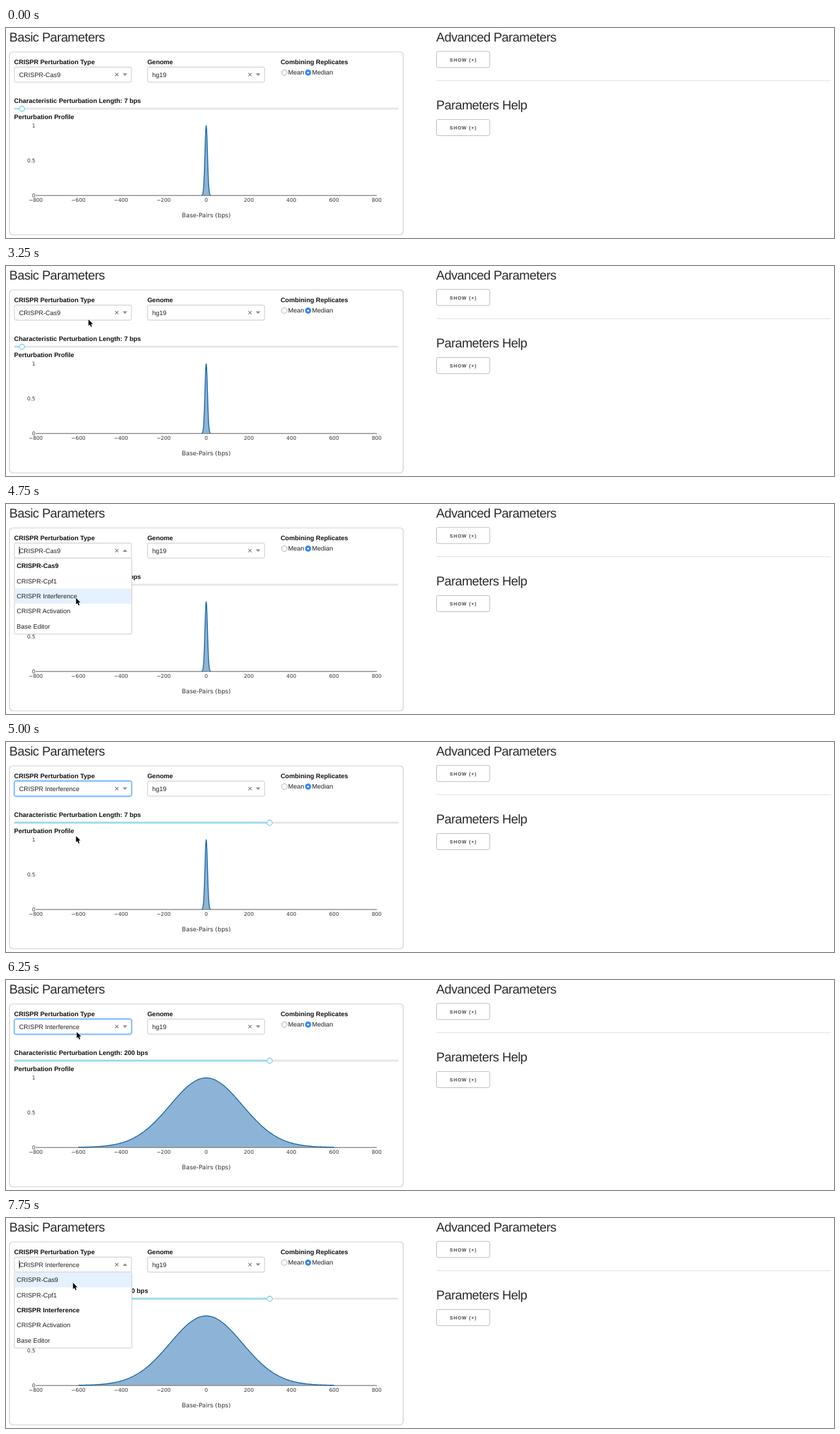
An HTML page that plays this animation: 1280 px wide and 325 px high, repeating every 8 s.

```html
<!DOCTYPE html>
<html lang="en">
<head>
<meta charset="utf-8">
<title>Parameters</title>
<style>
  html, body { margin: 0; width: 100%; height: 100%; overflow: hidden; background: #fff; }
  svg { display: block; width: 1280px; height: 325px; }
  text { font: 9.95px "Liberation Sans", Arial, sans-serif; fill: #222; text-rendering: geometricPrecision; white-space: pre; }
  .heading { font-size: 19.8px; letter-spacing: -.53px; fill: #2a2a2a; }
  .bold { font-weight: 700; fill: #111; }
  .button { font-size: 7.3px; font-weight: 700; letter-spacing: 1px; fill: #444; }
  .tick { font: 8px "DejaVu Sans", Verdana, sans-serif; fill: #333; }
  .title { font: 9.4px "DejaVu Sans", Verdana, sans-serif; fill: #333; }
</style>
</head>
<body>
<svg id="stage" viewBox="0 0 1280 325" xmlns="http://www.w3.org/2000/svg"></svg>
<script>
const LOOP = 8000;
const OPTIONS = ["CRISPR-Cas9", "CRISPR-Cpf1", "CRISPR Interference", "CRISPR Activation", "Base Editor"];
const ROW = 23.4, MENU_TOP = 84;

// Pointer stops: [time, x, y]
const POINTER = [
  [1000, 1097.5, 69.3], [1250, 394.5, 122], [1500, 381, 118.7], [1750, 268.8, 113.2],
  [2000, 261, 109.2], [2750, 232.8, 109.2], [3000, 148, 103.2], [3250, 127.5, 82.8],
  [3500, 126, 82], [4250, 116.8, 111.3], [4500, 108.3, 141.5], [4750, 108.3, 145.6],
  [6000, 106, 111.3], [6250, 109.4, 80.6], [7500, 104, 98.7], [7750, 103.6, 100.3]
];

const stage = document.getElementById("stage");

function add(tag, attrs = {}, parent = stage) {
  const node = document.createElementNS("http://www.w3.org/2000/svg", tag);
  set(node, attrs);
  parent.appendChild(node);
  return node;
}
function set(node, attrs) {
  for (const key in attrs) node.setAttribute(key, attrs[key]);
}
function show(node, visible) {
  node.setAttribute("visibility", visible ? "visible" : "hidden");
}
function text(x, y, string, kind = "", anchor = "start", parent = stage) {
  const node = add("text", { x, y, class: kind, "text-anchor": anchor }, parent);
  node.textContent = string;
  return node;
}
function box(x, y, width, height, rx, stroke, parent = stage) {
  return add("rect", { x, y, width, height, rx, stroke, fill: "#fff", "stroke-width": 1 }, parent);
}

const plotX = bps => 309.5 + bps * 0.3294;
const plotY = value => 259 - value * 107.5;

// Bell curve that falls to one half at the given length
function bell(length) {
  const points = [];
  for (let i = -120; i <= 120; i++) {
    const u = i / 40;
    points.push(plotX(u * length).toFixed(2) + " " + plotY(0.5 ** (u * u)).toFixed(2));
  }
  return "M" + points.join("L");
}

function select(x, value) {
  const frame = box(x, 60.5, 181, 23.3, 2.6, "#c8c8c8");
  const label = text(x + 7.2, 75.5, value);
  add("path", { d: `M${x + 155.8} 69.6l5 5m0 -5l-5 5`, stroke: "#777", "stroke-width": 1.1 });
  const arrow = add("path", { fill: "#888" });
  const point = up => arrow.setAttribute("d", up
    ? `M${x + 167.4} 74h7l-3.5 -3.7z`
    : `M${x + 167.4} 70.3h7l-3.5 3.7z`);
  point(false);
  return { frame, label, point };
}

function section(y, title) {
  text(665, y, title, "heading");
  box(665.5, y + 15.6, 82.3, 25, 2.6, "#bbb");
  text(707, y + 31, "SHOW (+)", "button", "middle");
}

section(20.6, "Advanced Parameters");
add("path", { d: "M665 81.6H1275", stroke: "#e1e1e1" });
section(126, "Parameters Help");

text(5, 20.6, "Basic Parameters", "heading");
box(5.4, 37, 608.6, 283, 5, "#cfcfcf").setAttribute("stroke-width", 1.2);

text(12.6, 56, "CRISPR Perturbation Type", "bold");
text(218.4, 56, "Genome", "bold");
text(424.4, 56, "Combining Replicates", "bold");

const glow = add("rect", { x: 11.8, y: 59.2, width: 183.4, height: 25.8, rx: 3.8, fill: "none", stroke: "#d3e8fd", "stroke-width": 1.8 });
const type = select(13, OPTIONS[0]);
select(218.8, "hg19");

add("circle", { cx: 430.4, cy: 69, r: 4.3, fill: "#fff", stroke: "#999", "stroke-width": .8 });
text(436, 71.8, "Mean");
add("circle", { cx: 467, cy: 69, r: 4.7, fill: "#2f86f2" });
add("circle", { cx: 467, cy: 69, r: 1.6, fill: "#fff" });
text(473, 71.8, "Median");

const lengthLabel = text(12.6, 116.2, "", "bold");
add("rect", { x: 12.6, y: 123.6, width: 594, height: 2.7, rx: 1.3, fill: "#e4e4e4" });
const track = add("rect", { x: 12.6, y: 123.6, height: 2.7, rx: 1.3 });
const handle = add("circle", { cy: 125, r: 4, fill: "#fff", stroke: "#7fcdf0", "stroke-width": 1.3 });

text(12.6, 141.4, "Perturbation Profile", "bold");
for (const value of [0, 0.5, 1]) text(45.4, plotY(value) + 2.7, value, "tick", "end");
for (let bps = -800; bps <= 800; bps += 200)
  text(plotX(bps), 269.2, String(bps).replace("-", "\u2212"), "tick", "middle");
text(309.6, 293.4, "Base-Pairs (bps)", "title", "middle");

const curve = add("path", { fill: "#8db4d6" });
add("path", { d: "M46 259.2H573.3", stroke: "#444", "stroke-width": .9 });
const outline = add("path", { fill: "none", stroke: "#1a69a8", "stroke-width": 1.4 });

const menu = add("g");
box(13, MENU_TOP - .2, 181.6, 5 * ROW + .4, 1.5, "#c8c8c8", menu);
const highlight = add("rect", { x: 13.5, width: 180.6, height: ROW, fill: "#e5f1fe" }, menu);
const items = OPTIONS.map((name, i) => text(16.6, MENU_TOP + i * ROW + 15.2, name, "", "start", menu));
const caret = add("rect", { x: 20, y: 66, width: .9, height: 12, fill: "#111" });

const pointer = add("path", {
  d: "M0 0V9.6L2.2 7.6L3.8 11.3L5.4 10.6L3.8 7H6.8Z",
  fill: "#000", stroke: "#fff", "stroke-width": 1, "paint-order": "stroke"
});

function render(t) {
  const within = (from, to) => t >= from && t < to;
  const chosen = t < 5000 ? 0 : 2;
  const firstOpen = within(3500, 5000);
  const open = firstOpen || t >= 6500;
  const hovered = firstOpen ? (t < 4500 ? 0 : 2) : (t < 7500 ? 2 : 0);

  type.label.textContent = OPTIONS[chosen];
  type.point(open);
  const focused = within(5000, 6500);
  type.frame.setAttribute("stroke", focused ? "#2f8ff5" : "#c8c8c8");
  show(glow, focused);

  show(menu, open);
  highlight.setAttribute("y", MENU_TOP + hovered * ROW);
  items.forEach((item, i) => item.setAttribute("class", i === chosen ? "bold" : ""));
  const opened = firstOpen ? 3500 : 6500;
  show(caret, open && (t - opened) % 1000 < 500);

  const knob = chosen ? 407.6 : 24.6;
  handle.setAttribute("cx", knob);
  set(track, { width: knob - 12.6, fill: chosen ? "#97daf3" : "#abe2fb" });

  const length = t < 5250 ? 7 : 200;
  lengthLabel.textContent = `Characteristic Perturbation Length: ${length} bps`;
  const shape = bell(length);
  curve.setAttribute("d", shape + "Z");
  outline.setAttribute("d", shape);

  const stop = POINTER.filter(([time]) => time <= t).pop();
  show(pointer, !!stop);
  if (stop) pointer.setAttribute("transform", `translate(${stop[1]} ${stop[2]})`);
}

const start = performance.now();
function tick() {
  render((performance.now() - start) % LOOP);
  requestAnimationFrame(tick);
}
tick();
</script>
</body>
</html>
```
